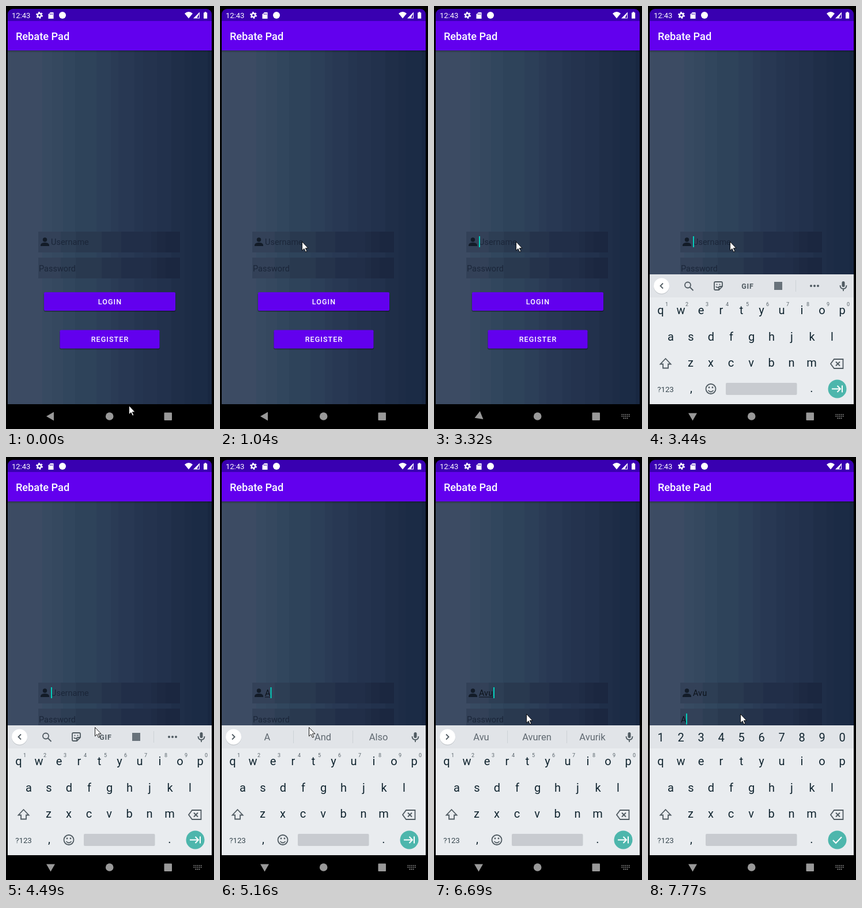
An HTML page that plays this animation: 361x733 px, repeating every 8 s.

```html
<!DOCTYPE html>
<html lang="en">
<head>
<meta charset="utf-8">
<title>Login screen</title>
<style>
  html, body { margin: 0; width: 100%; height: 100%; overflow: hidden; background: #000; }
  svg { display: block; width: 361px; height: 733px; font-family: Roboto, sans-serif; }
  .mid { text-anchor: middle; }
  .button { font-size: 12.5px; font-weight: 500; letter-spacing: 1.1px; fill: #fff; }
  .field { font-size: 14.5px; }
  .hint { fill: #1b2639; }
  .typed { fill: #0d131b; }
  .key { font-size: 20px; fill: #10242f; }
  .small { font-size: 9px; fill: #59646b; }
  .word { font-size: 16.5px; fill: #5f6870; }
  .line { fill: none; stroke: #505b62; stroke-width: 1.8; }
</style>
</head>
<body>
<svg viewBox="0 0 361 733">
  <defs>
    <clipPath id="screen"><rect x="3" y="5" width="354" height="723" rx="9"/></clipPath>
    <linearGradient id="shade" x2="0" y2="1">
      <stop stop-color="#000" stop-opacity=".28"/><stop offset="1" stop-color="#000" stop-opacity="0"/>
    </linearGradient>
  </defs>
  <rect width="361" height="733"/>
  <g clip-path="url(#screen)">
    <g id="backdrop"></g>
    <rect x="3" y="77" width="354" height="4" fill="url(#shade)"/>
    <rect x="3" y="5" width="354" height="22" fill="#3900b1"/>
    <rect x="3" y="26" width="354" height="51" fill="#6200ee"/>
  </g>

  <g fill="#fff">
    <text x="10" y="20.5" font-size="13">12:43</text>
    <circle cx="58" cy="16" r="3.2" fill="none" stroke="#fff" stroke-width="2.4"/>
    <circle cx="58" cy="16" r="5" fill="none" stroke="#fff" stroke-width="2" stroke-dasharray="2.6 2.636"/>
    <path d="M77 11h5.5v11h-9v-7.5z"/>
    <path d="M76.5 13v2M78.5 13v2M80.5 13v2" stroke="#3900b1"/>
    <circle cx="98" cy="16" r="6"/>
    <path d="M310 13q7-6 14 0l-7 8.5z"/>
    <path d="M336 10.500v11h-11z"/>
    <path d="M331.500 20.500h3.500v-7z" fill="#3900b1"/>
    <path d="M343 11.500h1.700v-1.300h2.800v1.300h1.700v10.300h-6.200z"/>
    <text x="17" y="59" font-size="18.2" font-weight="500">Rebate Pad</text>
  </g>

  <g id="fields"></g>
  <g fill="#131c28">
    <circle cx="67.500" cy="405" r="3.700"/>
    <path d="M60 416v-2q1-4 7.500-4t7.500 4v2z"/>
  </g>
  <text id="userHint" class="field hint" x="78" y="414">Username</text>
  <text id="passHint" class="field hint" x="57" y="459.500">Password</text>
  <text id="user" class="field typed" x="78" y="414"></text>
  <rect id="underline" x="78" y="415.500" height="1" fill="#0d131b"/>
  <text id="pass" class="field typed" x="57" y="459.500"></text>
  <rect id="caret" width="2" height="19" fill="#03d0bd"/>

  <g id="buttons"></g>

  <g id="keyboard">
    <rect x="3" y="465" width="354" height="225" fill="#e9ecef"/>
    <rect x="3" y="465" width="354" height="40" fill="#e1e4e8"/>
    <g id="bar">
      <circle cx="23.500" cy="486" r="13.500" fill="#b9bec3"/>
      <circle cx="23.500" cy="485" r="13.500" fill="#fff"/>
      <path id="chevron" class="line"/>
      <rect x="336.500" y="477" width="5" height="10" rx="2.500" fill="#505b62"/>
      <path class="line" stroke-width="1.500" d="M333.500 484q0 6 5.500 6t5.500-6M339 490v4"/>
    </g>
    <g id="tools">
      <circle class="line" cx="69" cy="483.500" r="5"/>
      <path class="line" d="M72.500 487l6 6"/>
      <path class="line" d="M129 486v-6q0-2-2-2h-10q-2 0-2 2v10q0 2 2 2h6zh-4q-2 0-2 2v4M118 486q2 3 4 1"/>
      <circle cx="119.500" cy="482.500" r="1.100" fill="#505b62"/>
      <circle cx="124.500" cy="482.500" r="1.100" fill="#505b62"/>
      <text class="mid" x="173" y="489.500" font-size="12.500" font-weight="700" letter-spacing=".8" fill="#505b62">GIF</text>
      <rect x="219" y="478" width="14" height="14" fill="#68727a"/>
      <path d="M256.500 475v20" stroke="#cdd2d6"/>
      <g fill="#505b62"><circle cx="283" cy="485" r="2"/><circle cx="289" cy="485" r="2"/><circle cx="295" cy="485" r="2"/></g>
    </g>
    <g id="words">
      <path d="M127.500 474v22M230.500 474v22" stroke="#cdd2d6"/>
    </g>
    <g id="digits"></g>
    <g id="letters"></g>
    <g id="corners"></g>
    <path id="shift" class="line" d="M30.500 611l9 9.500h-4.500v7h-9v-7h-4.500z"/>
    <path class="line" d="M323 612h15.500v16H323l-6-8zM326 616.500l7 7M333 616.500l-7 7"/>
    <text class="mid" x="30.500" y="668.500" font-size="13.300" fill="#37474f">?123</text>
    <text class="mid key" x="75" y="669" font-size="17">,</text>
    <text class="mid key" x="284" y="669" font-size="17">.</text>
    <g id="emoji">
      <circle class="line" cx="109" cy="663.500" r="8.500"/>
      <path class="line" stroke-width="1.500" d="M104.500 666q4.500 5 9 0"/>
      <circle cx="106" cy="661" r="1.400" fill="#505b62"/><circle cx="112" cy="661" r="1.400" fill="#505b62"/>
    </g>
    <rect id="space" y="653" height="21" rx="2" fill="#c8cbd0"/>
    <circle cx="328.500" cy="663.500" r="16" fill="#4db6ac"/>
    <path id="action" fill="none" stroke="#fff" stroke-width="2"/>
  </g>

  <rect y="690" width="361" height="43"/>
  <g fill="#999">
    <path id="back" d="M-7.500 0L5.500-7.500v15z"/>
    <circle cx="179.700" cy="711" r="6.800"/>
    <rect x="274.500" y="704.500" width="13.500" height="13.500" rx="1"/>
    <path id="imeIcon" fill="none" stroke="#999" stroke-width="1.700" stroke-dasharray="1.700 1.400" d="M325.500 708h14.500M325.500 711h14.500M328.500 714.300h8"/>
  </g>
  <path id="pointer" d="M.5.500v15.300l3.500-3.300 2.500 5.600 2.300-1-2.500-5.400h4.700z" fill="#fff" stroke="#000" stroke-width=".9"/>
</svg>

<script>
const el = id => document.getElementById(id);
const add = (parent, tag, attrs, text = '') => {
  const node = document.createElementNS('http://www.w3.org/2000/svg', tag);
  for (const name in attrs) node.setAttribute(name, attrs[name]);
  node.textContent = text;
  return parent.appendChild(node);
};
const set = (id, attrs) => { for (const name in attrs) el(id).setAttribute(name, attrs[name]); };
const show = (id, on) => { el(id).style.display = on ? '' : 'none'; };

// Vertical colour bands: each entry is [left edge, colour].
const bands = (parent, list, right, y, height) => list.forEach(([x, fill], i) => {
  const end = i + 1 < list.length ? list[i + 1][0] : right;
  add(parent, 'rect', { x, y, width: end - x, height, fill, 'shape-rendering': 'crispEdges' });
});
bands(el('backdrop'), [
  [3, '#3e4c63'], [8, '#3c4b63'], [63, '#374a61'], [80, '#35485f'], [99, '#31465d'],
  [120, '#2e435a'], [157, '#2c3f58'], [182, '#2a3b55'], [195, '#283853'], [223, '#253550'],
  [238, '#24334e'], [262, '#22314c'], [287, '#1f2e48'], [310, '#1d2c46'], [322, '#1b2b45'], [350, '#182741']
], 357, 77, 613);
for (const y of [391, 436]) bands(el('fields'), [
  [56, '#334158'], [95, '#2d3e54'], [121, '#29394f'], [166, '#25334b'],
  [200, '#212e48'], [252, '#1f2c45'], [262, '#1d2942'], [277, '#1b2740']
], 302, y, 36);

for (const [label, x, y, width] of [['LOGIN', 66, 496, 228], ['REGISTER', 93.5, 561.5, 173]]) {
  const g = el('buttons');
  add(g, 'rect', { x: x - .5, y: y + 1.5, width: width + 1, height: 32.5, rx: 3, fill: '#000', opacity: .3 });
  add(g, 'rect', { x, y, width, height: 32, rx: 2, fill: '#6200ee' });
  add(g, 'text', { x: 180.5, y: y + 20.7, class: 'mid button' }, label);
}

const row = (id, chars, x, y, cls) => [...chars].map((c, i) =>
  add(el(id), 'text', { x: x + i * 35, y, class: 'mid ' + cls }, c));
const letters = [['qwertyuiop', 22, 534], ['asdfghjkl', 39.5, 580], ['zxcvbnm', 74, 625]]
  .flatMap(([chars, x, y]) => row('letters', chars, x, y, 'key'));
row('corners', '1234567890', 32.5, 520, 'small');
row('digits', '1234567890', 22, 492.5, 'key');
const words = [82, 178.5, 275].map(x => add(el('words'), 'text', { x, y: 491, class: 'mid word' }));

// Each step changes part of the state at the given time; caret is an x position, 0 when hidden.
const steps = [
  [0, { at: [213, 692], caret: 0, user: '', pass: '', turn: 0, mode: '', caps: false, words: null, onPass: false }],
  [120, { at: [205, 652] }],
  [240, { at: [172, 520] }],
  [360, { at: [145, 428] }],
  [510, { at: [142, 408], caret: 78 }],
  [1040, { caret: 0 }],
  [1440, { caret: 78 }],
  [1960, { caret: 0 }],
  [2460, { caret: 78 }],
  [3020, { caret: 0 }],
  [3170, { caret: 78 }],
  [3320, { turn: 22, mode: 'nav' }],
  [3440, { turn: 90, mode: 'text' }],
  [3960, { caret: 0 }],
  [4370, { caret: 78, at: [149, 444] }],
  [4490, { at: [154, 468] }],
  [4920, { caret: 0, caps: true }],
  [5040, { caret: 87.5, user: 'A', words: ['A', 'And', 'Also'] }],
  [5160, { caps: false }],
  [5310, { caret: 95.5, user: 'Av', words: ['Av', 'Avoid', 'Avenue'] }],
  [5590, { caret: 103, user: 'Avu', words: ['Avu', 'Avuren', 'Avurik'] }],
  [5990, { caret: 0 }],
  [6420, { at: [156, 455] }],
  [6570, { at: [160, 445], caret: 103 }],
  [6810, { caret: 57, mode: 'password', onPass: true }],
  [7240, { caret: 0 }],
  [7770, { caret: 66, pass: 'A' }]
];

function draw(s) {
  const password = s.mode === 'password';
  set('pointer', { transform: `translate(${s.at})` });
  set('back', { transform: `translate(77.5 711) rotate(${-s.turn})` });
  show('imeIcon', s.mode);
  show('keyboard', s.mode === 'text' || password);

  show('userHint', !s.user);
  show('passHint', !s.pass);
  el('user').textContent = s.user;
  el('pass').textContent = s.pass;
  show('underline', s.user && !s.onPass);
  set('underline', { width: [0, 9.5, 17, 25][s.user.length] });
  show('caret', s.caret);
  set('caret', { x: s.caret, y: s.onPass ? 444.5 : 399 });

  show('bar', !password);
  show('tools', !password && !s.words);
  show('words', !password && s.words);
  show('digits', password);
  show('corners', !password);
  show('emoji', !password);
  words.forEach((node, i) => { node.textContent = s.words ? s.words[i] : ''; });
  set('chevron', { d: s.words ? 'M21 480.500l4.500 4.500-4.500 4.500' : 'M26 480.500l-4.500 4.500 4.500 4.500' });
  letters.forEach(node => {
    node.textContent = s.caps ? node.textContent.toUpperCase() : node.textContent.toLowerCase();
  });
  el('shift').style.fill = s.caps ? '#505b62' : 'none';
  set('space', password ? { x: 100, width: 158.5 } : { x: 135, width: 123.5 });
  set('action', { d: password ? 'M321 664l5 5 10-10.500' : 'M319 663.500h14.500M328.500 658l5.500 5.500-5.500 5.500M337 657.500v12' });
}

let shown = -1;
function tick() {
  const time = performance.now() % 8000;
  const current = steps.filter(([start]) => start <= time).length;
  if (current !== shown) {
    shown = current;
    draw(Object.assign({}, ...steps.slice(0, current).map(step => step[1])));
  }
  requestAnimationFrame(tick);
}
tick();
</script>
</body>
</html>
```
